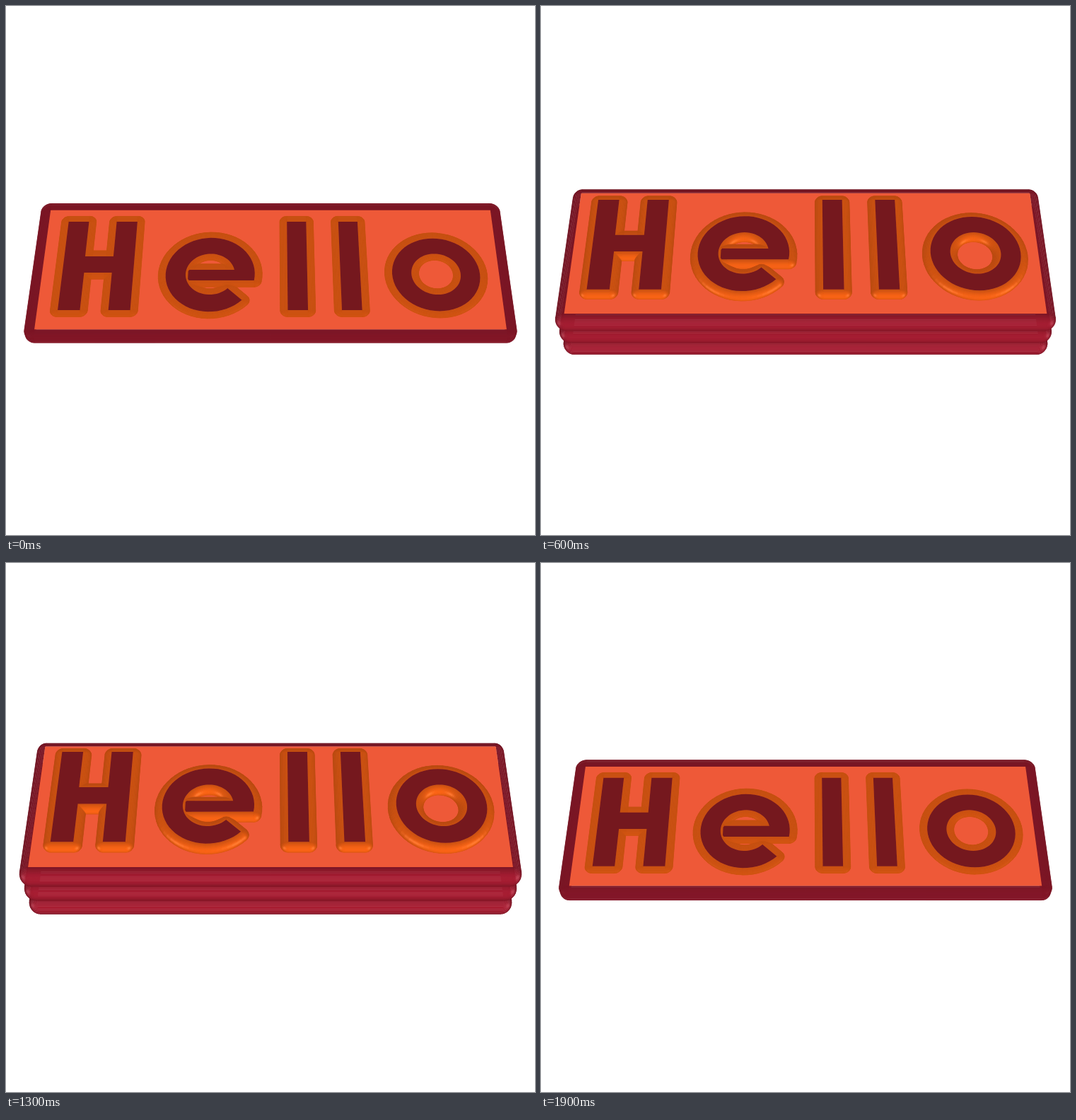
Animation, 748 px wide and 748 px high, one loop 2 s. Source, as an HTML page with a canvas:

```html
<!DOCTYPE html>
<html lang="en">
<head>
<meta charset="utf-8">
<title>Hello</title>
<style>
  html, body { margin: 0; width: 100%; height: 100%; overflow: hidden; background: #fff; }
  canvas { display: block; width: 100vmin; height: 100vmin; }
</style>
</head>
<body>
<canvas id="stage" width="748" height="748" role="img" aria-label="Hello"></canvas>
<script>
const ctx = document.getElementById('stage').getContext('2d');
const TAU = Math.PI * 2, RAD = Math.PI / 180;
const CENTER = 374, CAMERA = 1605, TILT = 34.3 * RAD;
const SIN = Math.sin(TILT), COS = Math.cos(TILT);
const SLICES = 22;

const PANEL = { color: [168, 30, 51], ambient: 0.66 };
const BEVEL = { color: [250, 101, 21], ambient: 0.74 };
const CORAL = 'rgb(238,89,56)', MAROON = 'rgb(117,24,30)';

// x runs right, y away from the viewer, z up from the ground plane
function project([x, y, z]) {
  const scale = CAMERA / (CAMERA + y * SIN - z * COS);
  return [CENTER + x * scale, CENTER - (y * COS + z * SIN) * scale];
}

const rect = (x0, y0, x1, y1) => [[x0, y0], [x1, y0], [x1, y1], [x0, y1]];

function arc(cx, cy, r, from, to) {
  const n = Math.ceil(Math.abs(to - from) / 6);
  return Array.from({ length: n + 1 }, (_, i) => {
    const a = (from + (to - from) * i / n) * RAD;
    return [cx + r * Math.cos(a), cy + r * Math.sin(a)];
  });
}

// Outline vertices with outward normal angles; convex corners fan out into round joins
function joints(points) {
  const count = points.length, list = [];
  const normal = (p, q) => Math.atan2(p[0] - q[0], q[1] - p[1]);
  points.forEach((p, i) => {
    const before = normal(points[(i + count - 1) % count], p);
    const after = normal(p, points[(i + 1) % count]);
    const turn = ((after - before + 3 * Math.PI) % TAU + TAU) % TAU - Math.PI;
    if (Math.abs(turn) < 0.3) {
      list.push({ p, a: before + turn / 2 });
    } else {
      const n = turn > 0 ? 8 : 1;
      for (let k = 0; k <= n; k++) list.push({ p, a: before + turn * k / n });
    }
  });
  return list;
}

const shape = (...outlines) => ({ outlines, rings: outlines.map(joints) });

const BASE = -71.8, TOP = 79.5;
const letterH = shape([
  [-292, BASE], [-261.5, BASE], [-261.5, -9.7], [-222.5, -9.7], [-222.5, BASE], [-192.5, BASE],
  [-192.5, TOP], [-222.5, TOP], [-222.5, 18.2], [-262.5, 18.2], [-262.5, TOP], [-292, TOP]
]);
const letterE = shape([
  ...arc(-84.5, -12, 62.5, -10, 316),
  ...arc(-84.5, -12, 34.5, 316, 12),
  [-114, -4.8], [-115.5, -7], [-115.5, -20.5], [-114, -22.9]
]);
const letterL = x => shape(rect(x, BASE, x + 27.8, TOP));
const letterO = shape(
  arc(232, -12, 61.5, 0, 354),
  arc(232, -12, 34.5, 354, 0)
);
const letters = [letterH, letterE, letterL(23.7), letterL(98), letterO];
const slab = shape(rect(-320.8, -101.6, 320.8, 101.6));

function trace(points) {
  points.forEach(([x, y], i) => i ? ctx.lineTo(x, y) : ctx.moveTo(x, y));
  ctx.closePath();
}

function face({ outlines }, z, color) {
  ctx.beginPath();
  for (const line of outlines) trace(line.map(([x, y]) => project([x, y, z])));
  ctx.fillStyle = color;
  ctx.fill('evenodd');
}

// Low contrast blends towards the brightness of a surface that faces straight up
function shade({ color, ambient }, nx, ny, nz, contrast) {
  const diffuse = Math.max(0, 0.1 * nx - 0.88 * ny + 0.47 * nz) ** 2;
  const glint = Math.max(0, 0.5 * Math.abs(nx) - 0.7 * ny + 0.5 * nz) ** 40;
  const level = 0.22 + (diffuse - 0.22) * contrast;
  const light = ambient + (1 - ambient) * level;
  return `rgb(${color.map(c => Math.round(c * light + 40 * glint * contrast))})`;
}

// Half-round moulding around a shape, painted slice by slice from the bottom up
function moulding({ rings }, width, z0, z1, material, contrast) {
  const mid = (z0 + z1) / 2, half = (z1 - z0) / 2;
  const slice = (ring, t) => ring.map(({ p, a }) => project([
    p[0] + Math.cos(a) * width * Math.cos(t),
    p[1] + Math.sin(a) * width * Math.cos(t),
    mid + half * Math.sin(t)
  ]));
  let lower = rings.map(ring => slice(ring, -Math.PI / 2));
  for (let s = 1; s <= SLICES; s++) {
    const t = (s / SLICES - 0.5) * Math.PI, tm = t - Math.PI / SLICES / 2;
    const upper = rings.map(ring => slice(ring, t));
    const out = Math.cos(tm), up = Math.sin(tm);
    rings.forEach((ring, r) => ring.forEach(({ a }, i) => {
      const j = (i + 1) % ring.length;
      const quad = [lower[r][i], lower[r][j], upper[r][j], upper[r][i]];
      const area = quad.reduce((sum, [x, y], k) => {
        const [u, v] = quad[(k + 1) % 4];
        return sum + x * v - u * y;
      }, 0);
      if (area >= 0) return;
      const b = ring[j].a;
      const am = Math.atan2(Math.sin(a) + Math.sin(b), Math.cos(a) + Math.cos(b));
      ctx.fillStyle = ctx.strokeStyle = shade(
        material, Math.cos(am) * out, Math.sin(am) * out, up, contrast);
      ctx.beginPath();
      trace(quad);
      ctx.fill();
      ctx.stroke();
    }));
    lower = upper;
  }
}

function draw(time) {
  const rise = (1 - Math.cos(time / 2000 * TAU)) / 2;
  const height = 14 + 123 * rise, top = height / 2;
  const contrast = Math.min(1, height / 100);
  ctx.fillStyle = '#fff';
  ctx.fillRect(0, 0, 748, 748);
  ctx.lineWidth = 0.5;
  ctx.lineJoin = 'round';
  for (let k = 0; k < 3; k++) {
    moulding(slab, 14, -top + height * k / 3, -top + height * (k + 1) / 3, PANEL, contrast);
  }
  face(slab, top, CORAL);
  const lid = top + 0.14 * height;
  for (const letter of letters) {
    moulding(letter, 10.3, top, lid, BEVEL, contrast);
    face(letter, lid, MAROON);
  }
}

const start = performance.now();
let shown = -1;
function tick() {
  const step = Math.floor((performance.now() - start) / 100) % 20;
  if (step !== shown) draw((shown = step) * 100);
  requestAnimationFrame(tick);
}
tick();
</script>
</body>
</html>
```
